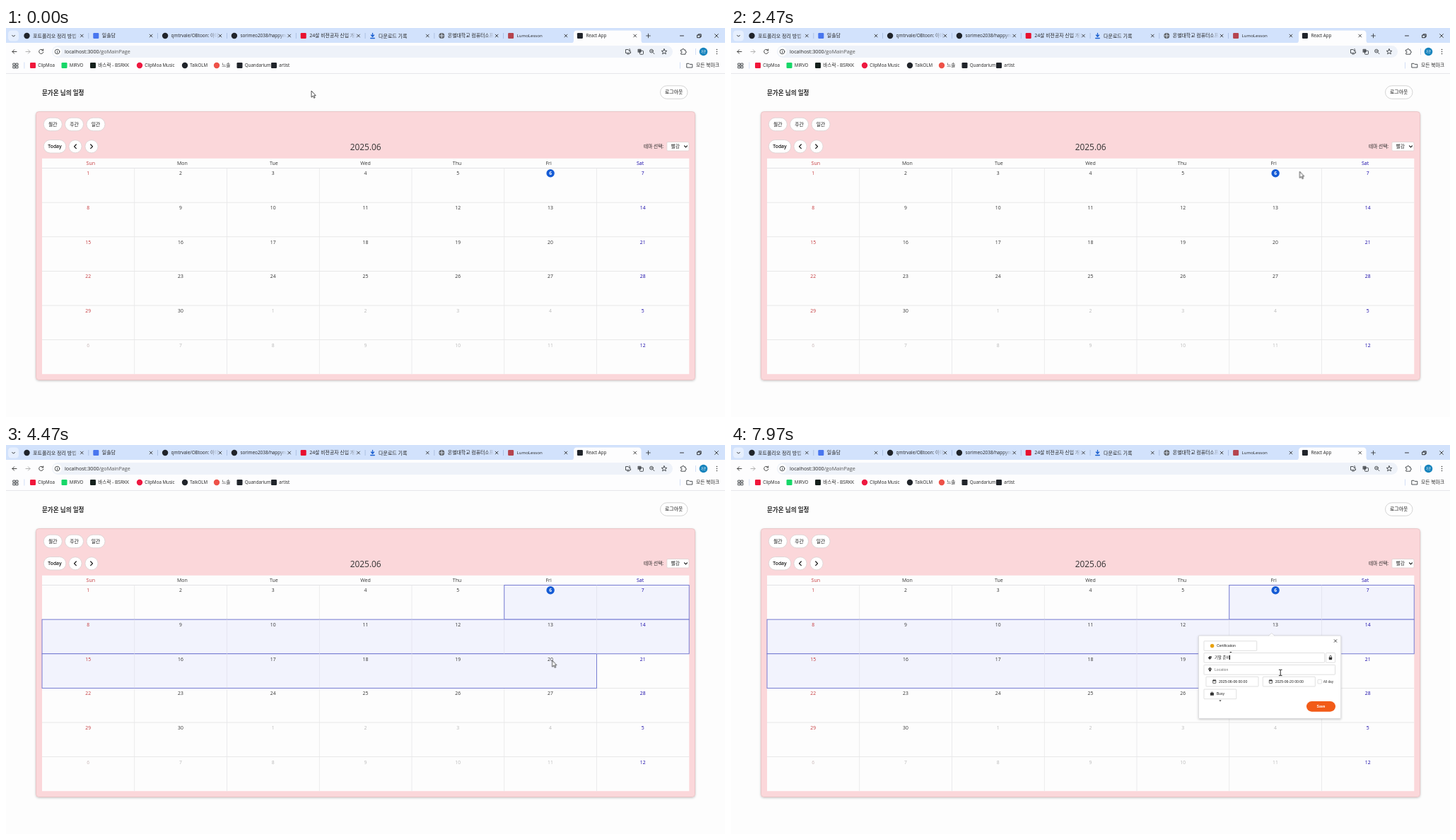
Recreate the animation shown at these times as an HTML page. Size 1017x551 px, loop 8 s.

```html
<!DOCTYPE html>
<html>
<head>
<meta charset="utf-8">
<title>Calendar</title>
<style>
html, body { margin: 0; width: 100%; height: 100%; overflow: hidden; background: #fdfdfd; }
body { position: relative; }
svg { font-family: "Open Sans", "Noto Sans CJK KR", "Noto Sans CJK", sans-serif; }
#stage { position: absolute; left: 0; top: 0; width: 1017px; height: 551px; display: block; }
.line { fill: none; stroke: #3c4043; stroke-width: .9; stroke-linecap: round; stroke-linejoin: round; }
.form text { font-family: "Liberation Sans", "Noto Sans CJK KR", sans-serif; }

#arrow, #beam, #day, #week, #range, #popup, #hint, #typed { animation: 8s infinite step-end; }
#arrow { animation-name: move, until-popup; animation-timing-function: linear, step-end; }
#beam, #popup { animation-name: from-popup; }
#day { animation-name: day; }
#week { animation-name: week; }
#range { animation-name: range; }
#hint { animation-name: hint; }
#typed { position: absolute; left: 684px; top: 297px; height: 8px; animation-name: from-popup;
  font: 5.4px/8px "Liberation Sans", "Noto Sans CJK KR", "Noto Sans CJK", sans-serif; color: #222; white-space: pre; }
#typed::before { content: ""; animation: type 8s infinite step-end; }
#typed::after { content: ""; position: absolute; right: -.8px; top: 1px; width: .7px; height: 6px;
  background: #111; animation: blink 8s infinite step-end; }

@keyframes move {
  0% { transform: translate(432px, 89px); animation-timing-function: ease-in-out; }
  22.9% { transform: translate(681px, 91px); animation-timing-function: ease-in-out; }
  37.9% { transform: translate(903px, 293px); animation-timing-function: ease-in-out; }
  46.2%, 47.5% { transform: translate(760px, 216px); }
  50% { transform: translate(761px, 247px); animation-timing-function: ease-out; }
  60%, 100% { transform: translate(776px, 322px); }
}
@keyframes until-popup { 0% { visibility: visible; } 61.5%, 100% { visibility: hidden; } }
@keyframes from-popup { 0% { visibility: hidden; } 61.5%, 100% { visibility: visible; } }
@keyframes day { 0% { visibility: hidden; } 47.5% { visibility: visible; } 50.6%, 100% { visibility: hidden; } }
@keyframes week { 0% { visibility: hidden; } 50.6% { visibility: visible; } 55.5%, 100% { visibility: hidden; } }
@keyframes range { 0% { visibility: hidden; } 55.5%, 100% { visibility: visible; } }
@keyframes hint { 0% { visibility: hidden; } 61.5% { visibility: visible; } 76.6%, 100% { visibility: hidden; } }
@keyframes type {
  0% { content: ""; }
  76.6% { content: "ㄱ"; }
  77.9% { content: "기"; }
  79.4% { content: "김"; }
  80.6% { content: "기마"; }
  82.5% { content: "기말"; }
  85% { content: "기말 "; }
  87.5% { content: "기말 ㅈ"; }
  89% { content: "기말 주"; }
  91.2% { content: "기말 준"; }
  93.7% { content: "기말 준ㅂ"; }
  95.6%, 100% { content: "기말 준비"; }
}
@keyframes blink {
  0%, 61.5% { opacity: 1; }
  68.1% { opacity: 0; }
  74.7%, 100% { opacity: 1; }
}
</style>
</head>
<body>
<svg id="stage" viewBox="0 0 1017 551">
  <defs>
    <linearGradient id="fade"><stop offset="0" stop-color="#d2e2fc" stop-opacity="0"/><stop offset="1" stop-color="#d2e2fc"/></linearGradient>
    <filter id="soft" x="-10%" y="-10%" width="120%" height="120%"><feDropShadow dx="0" dy="1" stdDeviation="1.6" flood-opacity=".22"/></filter>
  </defs>
  <g id="browser"></g>
  <g id="page"></g>
  <g id="day"></g>
  <g id="week"></g>
  <g id="range"></g>
  <g id="dates"></g>
  <g id="popup" class="form"></g>
  <path id="arrow" d="M0 0V9.2L2.2 7.2L3.7 10.3L5.1 9.6L3.7 6.7H6.2Z" fill="#fff" stroke="#222" stroke-width=".8"/>
  <path id="beam" class="line" style="stroke:#111" d="M775.3 318.3H776.6L777.2 318.8L777.8 318.3H779.1M777.2 318.8V326.2M775.3 326.6H776.6L777.2 326.2L777.8 326.6H779.1"/>
</svg>
<div id="typed"></div>
<script>
const put = (id, ...parts) => { document.getElementById(id).innerHTML = parts.flat().join(""); };
const rect = (x, y, w, h, fill, r = 0, more = "") =>
  `<rect x="${x}" y="${y}" width="${w}" height="${h}" rx="${r}" fill="${fill}" ${more}/>`;
const dot = (x, y, r, fill, more = "") => `<circle cx="${x}" cy="${y}" r="${r}" fill="${fill}" ${more}/>`;
const line = (d, style = "") => `<path class="line" d="${d}" style="${style}"/>`;
const shape = (d, fill) => `<path d="${d}" fill="${fill}"/>`;
// Text is placed by its vertical middle.
const text = (x, y, s, size, fill = "#222", more = "") =>
  `<text x="${x}" y="${y + size * .36}" font-size="${size}" fill="${fill}" ${more}>${s}</text>`;
const mid = 'text-anchor="middle"';
const bold = 'font-weight="700"';
const semi = 'font-weight="600"';
const edge = c => `stroke="${c}" stroke-width=".8"`;
const cross = (x, y, r) => line(`M${x - r} ${y - r}L${x + r} ${y + r}M${x + r} ${y - r}L${x - r} ${y + r}`, "stroke:#333");
const square = (x, y, c) => rect(x - 4, y - 4, 8, 8, c, 1.2);
const disc = (x, y, c) => dot(x, y, 4.2, c);
const globe = (x, y) => dot(x, y, 4, "#5f6368") + line(`M${x - 3} ${y}H${x + 3}M${x} ${y - 3}V${y + 3}`, "stroke:#dfe8f8");
const download = (x, y) => line(`M${x} ${y - 3.5}V${y + 1}M${x - 2} ${y - 1}L${x} ${y + 1.2}L${x + 2} ${y - 1}M${x - 2.8} ${y + 3.5}H${x + 2.8}`, "stroke:#1a5fd0;stroke-width:1.3");

const tabs = [
  [disc, "#20242a", "포트폴리오 정리 방법 추천", 7],
  [square, "#4876ef", "일솔담", 6.9],
  [disc, "#20242a", "qmtrvale/OBtoon: 이야기", 6.4],
  [disc, "#20242a", "sorimeo2038/happynut", 6.4],
  [square, "#e8102e", "24살 비전공자 신입 개발", 6.9],
  [download, "", "다운로드 기록", 7],
  [globe, "", "온별대학교 컴퓨터소프트", 6.9],
  [square, "#b5444e", "LumoLesson", 6.1],
  [square, "#20242a", "React App", 6.2]
];
const tabStrip = tabs.map(([icon, color, title, size], i) => {
  const x = 29.5 + i * 97.8, active = i === 8;
  return icon(x, 11, color)
    + `<svg x="${x + 8.5}" y="0" width="66" height="22">${text(0, 11, title, size)}</svg>`
    + (active ? "" : rect(x + 62, 3, 12.5, 16, "url(#fade)"))
    + cross(x + 77.8, 11, 1.9)
    + (i < 7 ? rect(x + 87, 7, .7, 8, "#9fb4d8") : "");
});

const bookmarks = [
  [38, square, "#f0163a", "ClipMoa"], [82.5, square, "#16d768", "MIRVO"],
  [123, square, "#14201c", "바스락 - BSRKK"], [189, disc, "#ee1840", "ClipMoa Music"],
  [253, disc, "#20242a", "TalkOLM"], [298, disc, "#ee5148", "느솔"],
  [330.5, square, "#20242a", "Quandarium"], [379, square, "#20242a", "artist"]
].map(([x, icon, color, label]) => icon(x, 53, color) + text(x + 7.3, 53, label, /[가-힣]/.test(label) ? 6.6 : 6.2));

put("browser",
  rect(0, 0, 1017, 22, "#d2e2fc"),
  rect(0, 21, 1017, 44, "#fdfdfe"),
  rect(3, 3.5, 15, 15, "#e6effe", 4.5), line("M8.7 10.3L10.6 12.2L12.5 10.3", "stroke:#222"),
  shape("M799 21.5Q803 21.5 803 17.5V8Q803 3.5 807.500 3.5H894Q898.500 3.5 898.500 8V17.5Q898.500 21.5 902.500 21.5Z", "#fdfdfe"),
  tabStrip,
  line("M905.7 11H911.3M908.5 8.2V13.8"),
  line("M953.5 11H958.5M978 10H982V13.7H978ZM979.2 10V8.800H983.2V12.500H982", "stroke:#222"),
  cross(1005, 11, 2.4),
  line("M15 33.500H9M11.600 30.800L9 33.500L11.600 36.200", "stroke:#333"),
  line("M28 33.500H34M31.400 30.800L34 33.500L31.400 36.200", "stroke:#aaa"),
  line("M52.300 31.500A3.100 3.100 0 1 0 52.800 34.200M52.700 30V32H50.700", "stroke:#333"),
  rect(65, 25, 878, 17, "#eef2f9", 8.5),
  dot(72.5, 33.5, 6.3, "#fff"),
  dot(72.5, 33.5, 3.3, "none", 'class="line"'), line("M72.5 33.300V35.2M72.5 31.800V31.900"),
  text(83, 33.5, 'localhost:3000<tspan fill="#555">/goMainPage</tspan>', 7.23),
  line("M880 30.500H876.500V35.500H883.500V33.500M878.500 37H881.500M882 29.500V33M880.800 31.900L882 33L883.200 31.900"),
  rect(893.500, 29.800, 5, 5, "#5f6368", .8), rect(896.500, 32.300, 5, 5, "#fff", .8, 'class="line"'),
  dot(913, 32.600, 2.4, "none", 'class="line"'), line("M914.900 34.500L917 36.700M912 32.600H914"),
  line("M931 29.700L932.100 32.200L934.800 32.400L932.700 34.200L933.400 36.800L931 35.400L928.600 36.800L929.300 34.200L927.200 32.400L929.900 32.200Z"),
  line("M954.800 31H956.500Q956.500 29.300 957.800 29.300Q959 29.300 959 31H961V33Q962.400 33 962.400 34.100Q962.400 35.200 961 35.200V37.200H954.800V35.200Q956.200 35 956.200 34.100Q956.200 33 954.800 33Z"),
  rect(975, 29, .8, 9, "#c8d8f4"),
  dot(986.500, 33.500, 5.800, "#1683bd"), text(986.500, 33.500, "가온", 4.2, "#fff", mid),
  [30.6, 33.5, 36.4].map(y => dot(1005.5, y, .75, "#333")),
  [10.2, 14.2].map(x => [50.1, 54].map(y => rect(x, y, 2.8, 2.8, "none", 0, 'class="line"')).join("")),
  rect(25.500, 48.500, .8, 9, "#c8d8f4"),
  bookmarks,
  rect(953, 48.500, .8, 9, "#c8d8f4"),
  line("M963.200 50.300H966L967 51.400H970.800V56H963.200Z"),
  text(976, 53, "모든 북마크", 6.8),
  rect(0, 64, 1017, .8, "#e1e3e7"));

const x0 = 51, y0 = 198.5, cw = 130.75, ch = 48.63;
const pill = (x, y, w, label, more = "") =>
  rect(x, y, w, 18.5, "#fff", 9.25, edge("#d9d2d2")) + text(x + w / 2, y + 9.3, label, 6.8, "#111", mid + more);
const tone = col => col === 0 ? "#c5393d" : col === 6 ? "#1708a8" : "#333";
const weekdays = ["Sun", "Mon", "Tue", "Wed", "Thu", "Fri", "Sat"];

put("page",
  text(51, 91.5, "문가온 님의 일정", 8.55, "#222", bold),
  rect(925.5, 81.800, 38.500, 18.500, "#fff", 9.25, edge("#c9c9c9")), text(944.700, 91, "로그아웃", 6.9, "#111", mid),
  rect(42.5, 118.5, 932, 380, "#fbd7da", 4, 'stroke="#e6bfc1" stroke-width=".8" filter="url(#soft)"'),
  pill(53.300, 127.2, 26, "월간"), pill(83.500, 127.2, 26, "주간"), pill(114, 127.2, 26, "일간"),
  pill(53.300, 158.500, 31.500, "Today", " " + semi),
  [98, 121].map((x, i) => {
    const d = i ? 1 : -1;
    return dot(x, 167.8, 9.1, "#fff", edge("#d9d2d2"))
      + line(`M${x - d * 1.3} 165L${x + d * 1.5} 167.8L${x - d * 1.3} 170.6`, "stroke:#111;stroke-width:1.2");
  }),
  text(508.7, 168.800, "2025.06", 11.9, "#333", mid),
  text(902, 167.8, "테마 선택:", 6.7),
  rect(934.800, 161.500, 31.200, 12.500, "#fff", 1.5, edge("#ddd0d0")), text(940.500, 167.8, "빨강", 6.8),
  line("M959.500 166.900L961.500 168.900L963.500 166.900", "stroke:#111;stroke-width:1.1"),
  rect(x0, 184.800, 915.3, 305.400, "#fdfdfd"),
  weekdays.map((d, i) => text(119.8 + i * 129.55, 191.800, d, 7, tone(i), mid)),
  Array.from({ length: 6 }, (_, r) => rect(x0, y0 + r * ch - .4, 915.3, .8, r ? "#e3e3e3" : "#dcdce0")),
  Array.from({ length: 6 }, (_, c) => rect(x0 + (c + 1) * cw - .4, y0, .8, ch * 6, "#e6e6e8")));

const span = (row, from, to) => rect(x0 + from * cw, y0 + row * ch, (to - from) * cw, ch, "#f2f3fd", 0, 'stroke="#6a70cf" stroke-width=".9"');
put("day", span(0, 5, 6));
put("week", span(0, 5, 7), span(1, 0, 6));
put("range", span(0, 5, 7), span(1, 0, 7), span(2, 0, 6),
  [1, 2, 3, 4].map(c => rect(x0 + c * cw - .3, y0 + ch, .6, ch * 2, "#dcdcea")),
  [5, 6].map(c => rect(x0 + c * cw - .3, y0 + ch, .6, ch, "#dcdcea")),
  rect(x0 + 6 * cw - .3, y0, .6, ch, "#dcdcea"));

put("dates", Array.from({ length: 42 }, (_, i) => {
  const col = i % 7, next = i >= 30;
  const x = x0 + (col + .5) * cw - .2, y = y0 + Math.floor(i / 7) * ch + 7.5;
  if (i === 5) return dot(x + .2, y - .2, 5.7, "#155bd5") + text(x + .2, y - .2, 6, 6.8, "#fff", mid + " " + bold);
  const color = next && col < 6 ? (col ? "#b9b9b9" : "#c9b8b8") : tone(col);
  return text(x, y, next ? i - 29 : i + 1, 6.8, color, mid);
}));

const box = (x, y, w, h = 13.7) => rect(x, y, w, h, "#fff", .6, 'stroke="#d3d3d3" stroke-width=".7"');
const calendar = x => rect(x - 2.1, 333, 4.2, 4.400, "none", .3, 'stroke="#333" stroke-width=".7"')
  + rect(x - 2.1, 333, 4.2, 1.4, "#333") + rect(x - 1.5, 332.2, .7, 1, "#333") + rect(x + .8, 332.2, .7, 1, "#333");
const caret = (x, y) => shape(`M${x - 1.6} ${y}H${x + 1.6}L${x} ${y + 1.7}Z`, "#222");
const small = (x, y, s, fill = "#222", more = "") => text(x, y, s, 5.1, fill, more);

put("popup",
  rect(661.300, 270, 201.500, 117.400, "#fff", 1, 'stroke="#d0d0d4" stroke-width=".8" filter="url(#soft)"'),
  shape("M760.500 270.500L764.700 266.600L768.900 270.500Z", "#fff"),
  line("M760.500 270L764.700 266.600L768.900 270", "stroke:#d0d0d4;stroke-width:.7"),
  cross(855, 277.500, 1.8),
  box(669, 277.700, 74.700), dot(680.600, 284.500, 2.7, "#e8a10c"), small(687, 284.200, "Certification"),
  caret(706.800, 293),
  box(669, 294.500, 170.500), shape("M674.700 301.500L677.200 299H679.700V301.500L677.200 304Z", "#333"), dot(678.600, 300.100, .5, "#fff"),
  `<g id="hint">${small(684.400, 301.300, "Subject", "#777")}</g>`,
  box(841.500, 294.500, 13), rect(845.800, 300.800, 4.3, 3.4, "#333", .4), line("M846.700 300.800V299.700A1.3 1.3 0 0 1 849.300 299.700V300.800", "stroke:#333;stroke-width:.8"),
  box(669, 311.500, 185.500),
  shape("M677.500 321.300Q675.400 318.600 675.400 317.300A2.100 2.100 0 0 1 679.600 317.300Q679.600 318.600 677.500 321.300Z", "#333"), dot(677.500, 317.400, .7, "#fff"),
  small(684, 318.300, "Location", "#777"),
  box(672, 328.300, 74), calendar(683.700), small(690, 335.200, "2025-06-06 00:00"),
  box(752.300, 328.300, 74), calendar(763.400), small(769.700, 335.200, "2025-06-20 00:00"),
  box(830, 332.400, 5.6, 5.6), text(837.700, 335.700, "All day", 4.85, "#333"),
  box(669, 346, 45.800), rect(677.900, 350.900, 5, 3.9, "#333", .4), line("M679.400 350.900V350H681.400V350.900", "stroke:#333;stroke-width:.7"),
  small(686.700, 352.600, "Busy"), caret(692, 361.500),
  rect(814, 363, 41, 14.700, "#f25b18", 7.35), small(834.500, 370.300, "Save", "#fff", mid + " " + bold));
</script>
</body>
</html>
```
